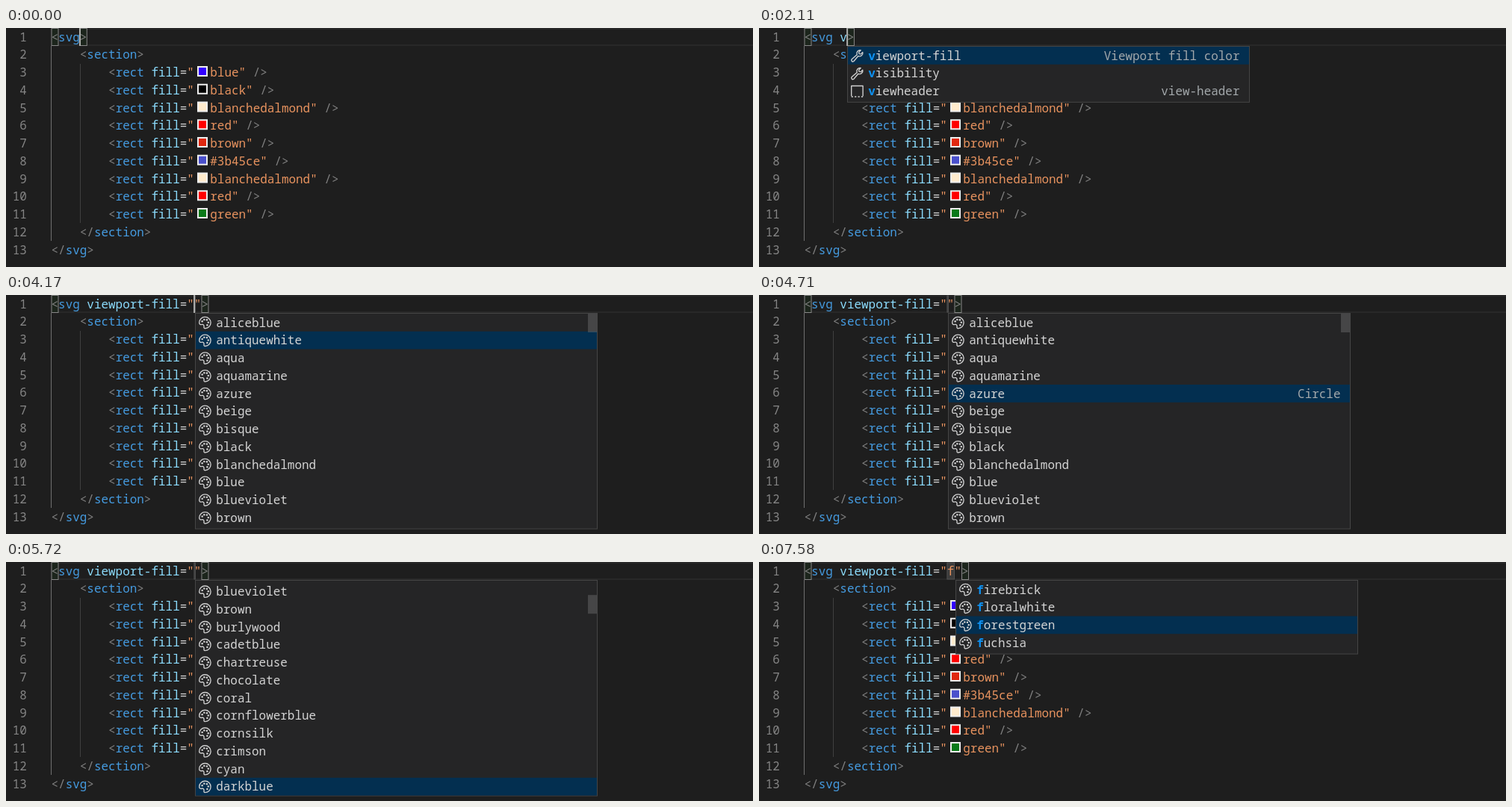
Write an HTML page that moves like this. It is 1000 by 320 pixels and loops after 8000 ms.

```html
<!DOCTYPE html>
<html lang="en">
<head>
<meta charset="utf-8">
<title>Attribute completion</title>
<style>
  html, body { margin: 0; height: 100%; overflow: hidden; background: #1e1e1e; }
  svg { display: block; width: 100%; height: 100%; }
  text { font: 15.95px "Noto Sans Mono", "DejaVu Sans Mono", monospace; white-space: pre; fill: #d4d4d4; }
  .num { fill: #858585; text-anchor: end; }
  .punct { fill: #808080; }
  .tag { fill: #459be0; }
  .attr { fill: #8cdcfe; }
  .str { fill: #e8935f; }
  .match { fill: #0e90f0; font-weight: bold; }
  .detail { fill: #a3a8ab; text-anchor: end; }
  .icon { fill: none; stroke: #d0d0d0; stroke-width: 1.25; stroke-linejoin: round; }
  .icon circle { fill: #d0d0d0; stroke: none; }
  .bracket { fill: #1c251c; stroke: #888; }
</style>
</head>
<body>
<svg viewBox="0 0 1000 320">
  <rect width="1000" height="320" fill="#1e1e1e"/>
  <path d="M61 1H1000M61 23H1000" stroke="#282828" stroke-width="2"/>
  <path d="M60.5 24V285" stroke="#707070"/>
  <path d="M99.5 48V261" stroke="#404040"/>
  <g id="code"></g>
  <g id="live"></g>
</svg>
<script>
const LOOP = 8000, LINE = 23.75, CHAR = 9.57, LEFT = 60.5, BASE = 17.5;
const VISIBLE = 12, POPUP_TOP = 24.5, POPUP_WIDTH = 539, PAD = 2.6;

const colX = col => LEFT + col * CHAR;
const escape = s => s.replace(/&/g, '&amp;').replace(/</g, '&lt;').replace(/>/g, '&gt;');
const span = (cls, s) => `<tspan class="${cls}">${escape(s)}</tspan>`;
const text = (x, y, content, cls = '') => `<text x="${x}" y="${y}" class="${cls}">${content}</text>`;
const rect = (x, y, w, h, attrs) => `<rect x="${x}" y="${y}" width="${w}" height="${h}" ${attrs}/>`;

// Static document
const FILLS = [
  ['blue', '#3300ff'], ['black', '#000'], ['blanchedalmond', '#ffebcd'],
  ['red', '#ff0000'], ['brown', '#e02810'], ['#3b45ce', '#4a50cc'],
  ['blanchedalmond', '#ffebcd'], ['red', '#ff0000'], ['green', '#0a7a1a']
];

const tagLine = (row, col, open, name) =>
  text(colX(col), row * LINE + BASE, span('punct', open) + span('tag', name) + span('punct', '>'));

function rectLine([name, color], i) {
  const top = (i + 2) * LINE, y = top + BASE;
  return text(colX(8), y, span('punct', '<') + span('tag', 'rect') + span('attr', ' fill') + '=' + span('str', '"'))
    + rect(257, top + 4.5, 12, 12, `fill="${color}" stroke="#eee" stroke-width="2"`)
    + text(273.3, y, span('str', name + '"') + span('punct', ' />'));
}

document.getElementById('code').innerHTML =
  Array.from({ length: 13 }, (_, i) => text(27.8, i * LINE + BASE, i + 1, 'num')).join('')
  + tagLine(1, 4, '<', 'section') + FILLS.map(rectLine).join('')
  + tagLine(11, 4, '</', 'section') + tagLine(12, 0, '</', 'svg');

// Completion lists
const ICONS = {
  property: '<path d="M12.4 1.4a4 4 0 0 0-4.6 5.4L1.5 12.3a1.7 1.7 0 0 0 2.4 2.4L9.3 8.4a4 4 0 0 0 5.4-4.7L12.4 6 10.4 5.7 10.1 3.7z"/>',
  color: '<path d="M8 1a7 7 0 0 1 0 14c-1.6 0-1.3-1.6-1.2-2.6.1-1.5-1-2.6-2.4-2.3C2.6 10.6 1 10.2 1 8a7 7 0 0 1 7-7z"/>'
    + [[4.6, 6.4], [7, 4.2], [10.3, 4.6], [12, 7.6], [10.7, 10.8]]
      .map(([x, y]) => `<circle cx="${x}" cy="${y}" r="1.15"/>`).join(''),
  snippet: '<path d="M1 14V1.5H15V14"/><path d="M1 14.7H15" stroke-dasharray="2 2"/>'
};

const toItems = (kind, names) => names.split(' ').map(label => ({ kind, label }));

const attributes = toItems('property', 'alignment-baseline baseline-shift class clip clip-path clip-rule color '
  + 'color-interpolation color-interpolation-filters color-profile color-rendering cursor');
attributes[0].detail = 'Alignment baseline';

const viewItems = [
  { kind: 'property', label: 'viewport-fill', detail: 'Viewport fill color' },
  { kind: 'property', label: 'visibility' },
  { kind: 'snippet', label: 'viewheader', detail: 'view-header' }
];

const colors = toItems('color', 'aliceblue antiquewhite aqua aquamarine azure beige bisque black blanchedalmond blue '
  + 'blueviolet brown burlywood cadetblue chartreuse chocolate coral cornflowerblue cornsilk crimson cyan darkblue');
colors[4].detail = 'Circle';
colors[14].detail = 'Mask';

const fColors = toItems('color', 'firebrick floralwhite forestgreen fuchsia');

const attributeList = { left: 109, items: attributes, typed: 0, thumb: 50 };
const colorList = { left: 253, items: colors, typed: 0, thumb: 25 };
const viewList = (left, typed) => ({ left, items: viewItems, typed });
const fList = { left: 263, items: fColors, typed: 1 };

// Each step changes part of the state from its time on
const STEPS = [
  [0, { attr: '', value: null, caret: true, list: null, sel: 0 }],
  [250, { attr: ' ' }],
  [730, { caret: false }],
  [800, { list: attributeList }],
  [1250, { caret: true }],
  [1710, { caret: false }],
  [2110, { attr: ' v', caret: true, list: viewList(118, 1) }],
  [2340, { attr: ' vi', list: viewList(128, 2) }],
  [2800, { caret: false }],
  [3200, { attr: ' viewport-fill', value: '', caret: true, list: null }],
  [3680, { caret: false }],
  [3750, { list: colorList }],
  [4170, { caret: true, sel: 1 }],
  [4630, { caret: false, sel: 2 }],
  [4710, { sel: 4 }],
  [4780, { sel: 7 }],
  [4860, { sel: 9 }],
  [4930, { sel: 12 }],
  [5010, { sel: 14 }],
  [5090, { sel: 16 }],
  [5160, { sel: 19, caret: true }],
  [5240, { sel: 21 }],
  [5720, { caret: false }],
  [6100, { value: 'f', caret: true, list: fList, sel: 0 }],
  [6650, { caret: false }],
  [7120, { caret: true }],
  [7350, { sel: 1 }],
  [7520, { sel: 2 }],
  [7580, { caret: false }]
];
let merged = {};
const states = STEPS.map(([time, change]) => (merged = { ...merged, ...change, time }));

function drawFirstLine({ attr, value, caret }) {
  const filled = value !== null;
  const caretCol = 4 + attr.length + (filled ? 2 + value.length : 0);
  const closeCol = caretCol + (filled ? 1 : 0);
  const bracket = col => rect(colX(col) + .5, .5, 9, 23, 'class="bracket"');
  let out = bracket(0) + bracket(closeCol);
  if (filled) {
    out += rect(colX(20), 1, Math.max(1.5, value.length * CHAR), 22, 'fill="#3b3b3b" stroke="#525252"');
  }
  out += text(LEFT, BASE, span('punct', '<') + span('tag', 'svg') + span('attr', attr)
    + (filled ? '=' + span('str', `"${value}"`) : '') + span('punct', '>'));
  if (caret) out += rect(colX(caretCol) - .8, 0, 2, 24, 'fill="#aeafad"');
  return out;
}

function drawPopup({ list, sel }) {
  if (!list) return '';
  const { left, items, typed, thumb } = list;
  const first = Math.max(0, sel - VISIBLE + 1);
  const shown = items.slice(first, first + VISIBLE);
  const start = POPUP_TOP + .5 + (first ? PAD : 0);
  let out = rect(left + .5, POPUP_TOP, POPUP_WIDTH - 1, shown.length * LINE + PAD + 1, 'fill="#252526" stroke="#454545"');
  shown.forEach(({ kind, label, detail }, i) => {
    const top = start + i * LINE, selected = first + i === sel;
    if (selected) out += rect(left + 1, top, POPUP_WIDTH - 2, LINE, 'fill="#032f50"');
    out += `<g class="icon" transform="translate(${left + 4.6} ${top + 3.3}) scale(1.1)">${ICONS[kind]}</g>`;
    out += text(left + 28.2, top + BASE, span('match', label.slice(0, typed)) + label.slice(typed));
    if (detail && (selected || kind === 'snippet')) out += text(left + 525.5, top + BASE, detail, 'detail');
  });
  if (thumb) out += rect(left + 526, 25 + first * 1.92, 12, thumb, 'fill="#797979" fill-opacity=".4"');
  return out;
}

const live = document.getElementById('live');
const origin = performance.now();
let current;

function render() {
  const time = (performance.now() - origin) % LOOP;
  const state = states.findLast(s => s.time <= time);
  if (state !== current) {
    current = state;
    live.innerHTML = drawFirstLine(state) + drawPopup(state);
  }
  requestAnimationFrame(render);
}
render();
</script>
</body>
</html>
```
